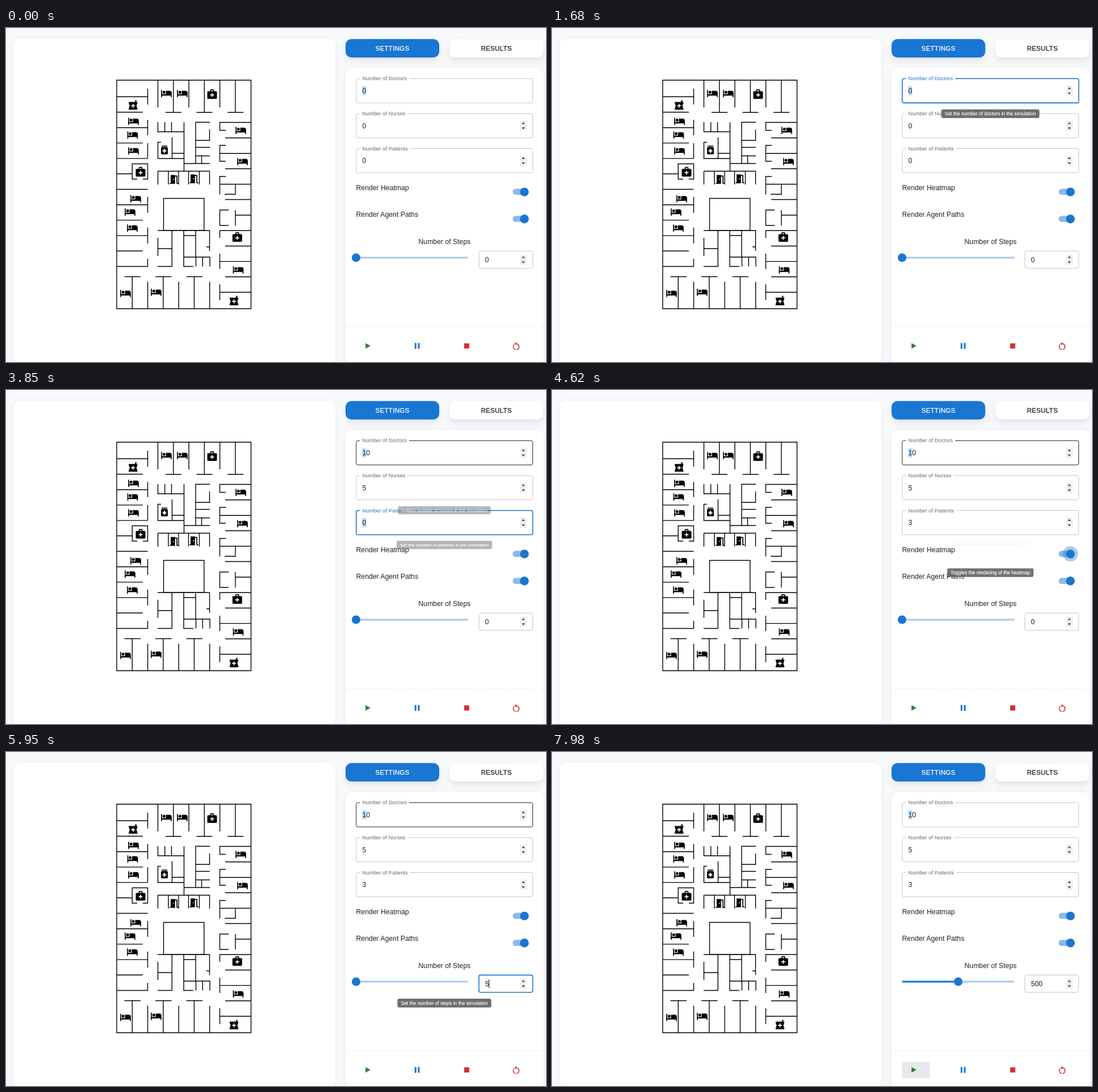
Recreate the animation shown at these times as an HTML page. Size 951x589 px, loop 8 s.

```html
<!DOCTYPE html>
<html lang="en">
<head>
<meta charset="utf-8">
<title>Hospital simulation settings</title>
<style>
  html, body { margin: 0; width: 100%; height: 100%; overflow: hidden; background: #f8f9fb; }
  svg { display: block; width: 951px; height: 589px; font-family: "Liberation Sans", Arial, sans-serif; }
  .card { fill: #fff; filter: drop-shadow(0 2px 6px rgba(40, 60, 90, .07)); }
  .tab { filter: drop-shadow(0 5px 6px rgba(40, 60, 90, .12)); }
</style>
</head>
<body>
<svg id="stage" viewBox="0 0 951 589"></svg>
<script>
const LOOP = 8000;
const BLUE = '#1976d2', INK = '#212121';
const stage = document.getElementById('stage');

function add(tag, attrs, parent = stage) {
  const el = document.createElementNS('http://www.w3.org/2000/svg', tag);
  set(el, attrs);
  parent.appendChild(el);
  return el;
}
function set(el, attrs) {
  for (const k in attrs) el.setAttribute(k, attrs[k]);
}
function text(str, x, y, size, attrs = {}, parent = stage) {
  const el = add('text', { x, y, 'font-size': size, fill: INK, ...attrs }, parent);
  el.textContent = str;
  return el;
}
const rect = (x, y, width, height, attrs, parent) => add('rect', { x, y, width, height, ...attrs }, parent);
const show = (el, on) => set(el, { opacity: +on });
const clamp = v => Math.max(0, Math.min(1, v));
const smooth = v => { v = clamp(v); return v * v * (3 - 2 * v); };
const ramp = (t, start, dur) => smooth((t - start) / dur);
const within = (t, a, b) => t >= a && t < b;
const mix = (a, b, p) => `rgb(${a.map((v, i) => Math.round(v + (b[i] - v) * p))})`;

// Cards and tabs
rect(13.5, 19, 566.5, 573, { rx: 12, class: 'card' });
rect(598, 70.5, 348.5, 522, { rx: 12, class: 'card' });
rect(598, 19.5, 165, 32.5, { rx: 10.5, fill: BLUE, class: 'tab' });
rect(781, 19.5, 165, 32.5, { rx: 10.5, fill: '#fff', class: 'tab' });
const tabText = { 'text-anchor': 'middle', 'letter-spacing': .35, 'stroke-width': .3 };
text('SETTINGS', 680.5, 39.5, 11.48, { ...tabText, fill: '#fff', stroke: '#fff' });
text('RESULTS', 863.7, 39.5, 11.48, { ...tabText, stroke: INK });

// Floor plan
const PITCH = 27.28;
let plan = 'M195 92H431.5V495H195Z';
const hline = (y, a, b) => { plan += `M${a} ${y}H${b}`; };
const vline = (x, a, b) => { plan += `M${x} ${a}V${b}`; };
for (let i = 0; i < 6; i++) {
  vline(267.5 + PITCH * i, 92, i % 2 ? 149 : 140);
  vline(222.3 + PITCH * i, i % 2 ? 447.5 : 438.5, 495);
}
for (let i = 0; i < 3; i++) {
  hline(148.8, 281 + 2 * PITCH * i, 309 + 2 * PITCH * i);
  hline(438.5, 208.5 + 2 * PITCH * i, 237 + 2 * PITCH * i);
}
[249.5, 241, 249.5, 241, 249.5, 222, 249.5, 249.5, 241, 249.5, 241, 249.5]
  .forEach((end, i) => hline(121.3 + 27.2 * i, 195, end));
[[107, 135], [162, 189], [203, 230], [298, 326], [352, 380], [407, 421]]
  .forEach(([a, b]) => vline(249.5, a, b));
[253, 286, 304, 321.5, 340.5, 358.5].forEach((x, i) => vline(i ? x : 267.5, 252.5, 276));
plan += 'M231 266.5H222.3V239.5H249.5V266.5H241';
const rightWing = 'M431 166.5H376.5V180.5H387M386 193.8H431M387 207H376.5V235H387M376.5 221.3H431' +
  'M386 248.3H431M387 261.8H376.5V293.5M376.5 275.5H431M404 275.5V293.3H385M386 302.5H431' +
  'M392 321H376.5V348.3H392M404 321V348.3M404 330H431M431 357.3H376.5V370M386 384.5H431' +
  'M376.5 398V425M376.5 411.6H431M386 438.8H431M376.5 452V480M376.5 466H431';
const core = 'M267.5 166V183H313.5M279.7 166V183M291.5 166V183M313.5 166.3V252.5M359 166.3H334V239' +
  'M358.5 179V198.3H334M334 210.5H359M334 225.5H359M344.5 225.5V239M313.5 239H359' +
  'M273 201.5H267.5V230.3H313.5M292.5 193V230.3M292.5 221H313.5M267.5 252.5H359M277.5 300.5H348.8V357H277.5Z' +
  'M267 357.2H359M267.5 370V402M267.5 389H292.3M292.3 357V420.5H267M313 357V420.5H330M313 366H334' +
  'M334 357V404M358.5 357V393M353 386H358.5M313 404H359V420.5M334.5 404V420.5M346.3 404V420.5';
add('path', { d: plan + rightWing + core, fill: 'none', stroke: '#000', 'stroke-width': 1.4 });

function icons(d, cx, cy, spots, scale = .85, fill = '#000') {
  for (const [x, y] of spots) {
    add('path', { d, fill, transform: `translate(${x} ${y}) scale(${scale}) translate(${-cx} ${-cy})` });
  }
}
const BED = 'M7 13c1.66 0 3-1.34 3-3S8.66 7 7 7s-3 1.34-3 3 1.34 3 3 3zm12-6h-8v7H3V5H1v15h2v-3h18v3h2v-9c0-2.21-1.79-4-4-4z';
const KIT = 'M20 6h-4V4c0-1.1-.9-2-2-2h-4c-1.1 0-2 .9-2 2v2H4c-1.1 0-2 .9-2 2v12c0 1.1.9 2 2 2h16c1.1 0 2-.9 2-2V8c0-1.1-.9-2-2-2zM10 4h4v2h-4V4zm6 11h-3v3h-2v-3H8v-2h3v-3h2v3h3v2z';
const MORTAR = 'M21 5h-2.64l1.14-3.14L17.15 1l-1.46 4H3v2l2 6-2 6v2h18v-2l-2-6 2-6V5zm-5 9h-3v3h-2v-3H8v-2h3V9h2v3h3v2z';
const PILLS = 'M6 3h12v2H6zm11 3H7c-1.1 0-2 .9-2 2v11c0 1.1.9 2 2 2h10c1.1 0 2-.9 2-2V8c0-1.1-.9-2-2-2zm-1 9h-2.5v2.5h-3V15H8v-3h2.5V9.5h3V12H16v3z';
const DOOR = 'M14 6v15H3v-2h2V3h9v1h5v15h2v2h-4V6h-3zm-4 5v2h2v-2h-2z';
const RESET = 'M12 5V2L8 6l4 4V7c3.31 0 6 2.69 6 6 0 2.97-2.17 5.43-5 5.91v2.02c3.95-.49 7-3.85 7-7.93 0-4.42-3.58-8-8-8zm-6 8c0-1.65.67-3.15 1.76-4.24L6.34 7.34C4.9 8.79 4 10.79 4 13c0 4.08 3.05 7.44 7 7.93v-2.02c-2.83-.48-5-2.94-5-5.91z';
icons(BED, 12, 12.5, [[282.5, 115.5], [310.5, 115.5], [224.5, 164.5], [223, 188.5], [224.5, 216.5],
  [413.5, 180.5], [416.5, 235.5], [228.5, 301], [218.5, 324.5], [222.5, 352.8], [409, 426.5],
  [210.5, 468], [264.5, 466]]);
icons(KIT, 12, 12, [[363, 116.5], [237, 253.5], [407.3, 368.5]]);
icons(MORTAR, 12, 11, [[223.8, 135.5], [401.5, 480.5]]);
icons(PILLS, 12, 12, [[279, 215.2]]);
icons(DOOR, 12, 12, [[296, 267], [331, 266]]);

// Number inputs: box, spinner, caret and selection
function makeField(x, y, w, h, name) {
  const r = 3, x2 = x + w, y2 = y + h, cy = y + h / 2;
  const box = add('path', { fill: 'none' });
  let label, from = x + r, to = x + r;
  if (name) {
    label = text(name, x + 10.7, y + 3, 9.18, { 'letter-spacing': .1 });
    from = x + 6.5;
    to = x + 14.5 + label.getComputedTextLength();
  }
  set(box, { d: `M${to} ${y}H${x2 - r}Q${x2} ${y} ${x2} ${y + r}V${y2 - r}Q${x2} ${y2} ${x2 - r} ${y2}` +
    `H${x + r}Q${x} ${y2} ${x} ${y2 - r}V${y + r}Q${x} ${y} ${x + r} ${y}H${from}` });
  const left = x + 10.6;
  const select = rect(left, cy - 8, 6.9, 16, { fill: '#b9dafb' });
  const value = text('0', left, cy + 4.4, 12.24);
  const caret = rect(left, cy - 7.5, 1, 15, { fill: '#000' });
  const spin = add('g', {});
  rect(905.5, cy - 9, 11.5, 18, { fill: '#efefef' }, spin);
  add('path', { fill: '#444', d: `M908.3 ${cy - 3}h5.6l-2.8 -3.4zM908.3 ${cy + 3}h5.6l-2.8 3.4z` }, spin);
  return { box, label, left, select, value, caret, spin };
}
function drawField(f, s) {
  set(f.box, {
    stroke: s.focus ? BLUE : s.hover ? INK : '#c4c4c4',
    'stroke-width': s.focus ? 1.6 : 1
  });
  if (f.label) set(f.label, { fill: mix([102, 102, 102], [25, 118, 210], s.tint) });
  f.value.textContent = s.value;
  show(f.spin, s.focus || s.hover);
  show(f.select, s.select);
  show(f.caret, s.caret >= 0);
  set(f.caret, { x: f.left + Math.max(0, s.caret) * 6.8 - .1 });
}
const doctors = makeField(616.8, 89.3, 310.8, 42.8, 'Number of Doctors');
const nurses = makeField(616.8, 150.9, 310.8, 42.8, 'Number of Nurses');
const patients = makeField(616.8, 212.5, 310.8, 42.8, 'Number of Patients');
const steps = makeField(832.8, 393.4, 94.8, 30.4);
const tint = (t, a, b) => ramp(t, a - 60, 200) - ramp(t, b - 60, 200);

// Switches
function makeSwitch(name, y) {
  text(name, 616.5, y - 3.4, 12.24);
  rect(892.3, y - 5.4, 26.2, 10.7, { rx: 5.35, fill: '#8cbae8' });
  const halo = add('circle', { cx: 913, cy: y, r: 14, fill: BLUE });
  add('circle', { cx: 913, cy: y + .8, r: 7.8, fill: '#000', opacity: .16 });
  add('circle', { cx: 913, cy: y, r: 7.6, fill: BLUE });
  return halo;
}
const heatHalo = makeSwitch('Render Heatmap', 289);
const pathHalo = makeSwitch('Render Agent Paths', 336.7);
function drawHalo(el, t, a, b) {
  const pulse = 13.9 - .5 * Math.cos((t - a) / 400);
  set(el, { r: pulse, opacity: .38 * (ramp(t, a - 20, 130) - ramp(t, b - 20, 150)) });
}

// Slider
text('Number of Steps', 772.2, 381, 12.24, { 'text-anchor': 'middle' });
rect(616.5, 403.4, 197.8, 3, { rx: 1.5, fill: '#a7c8ec' });
const fill = rect(616.5, 403.4, 0, 3, { rx: 1.5, fill: BLUE });
const thumbHalo = add('circle', { cy: 405, r: 13.6, fill: BLUE });
const thumb = add('circle', { cy: 405, r: 7.6, fill: BLUE });

// Controls
add('path', { d: 'M598 527H946', stroke: '#e4e7ea', 'stroke-dasharray': '2.3 1.5', 'stroke-width': .9 });
const press = rect(616.5, 546, 49, 29, { rx: 3, fill: '#e6e9ea' });
add('path', { d: 'M633.2 555.7V565.5L641.7 560.6Z', fill: '#2e7d32' });
add('path', { d: 'M719.7 555.5h3v10.3h-3zM725.4 555.5h3v10.3h-3z', fill: BLUE });
rect(806.8, 556.2, 9, 9, { fill: '#d32f2f' });
icons(RESET, 12, 11.5, [[898.5, 560.8]], .72, '#c62828');

// Tooltips
const tips = [
  ['Set the number of doctors in the simulation', 143.4, 1280, 2870],
  ['Set the number of nurses in the simulation', 205, 2870, 3780],
  ['Set the number of patients in the simulation', 266, 3780, 4480],
  ['Toggles the rendering of the heatmap', 314.4, 4480, 4760],
  ['Toggles the rendering of the agent paths', 362.1, 4760, 4970],
  ['Set the number of steps in the simulation', 435, 4970, 6930]
].map(([str, y, start, end]) => {
  const g = add('g', {});
  const back = rect(0, 0, 0, 15.4, { rx: 3, fill: '#616161', 'fill-opacity': .92 }, g);
  const label = text(str, 0, 10.7, 8.45, { fill: '#fff', stroke: '#fff', 'stroke-width': .15, 'text-anchor': 'middle' }, g);
  const w = label.getComputedTextLength() + 12.3;
  set(back, { x: -w / 2, width: w });
  return { g, y, start: start - 20, end: end - 20 };
});
function drawTip(tip, t) {
  const D = 180;
  const alpha = ramp(t, tip.start, D) - ramp(t, tip.end, D);
  const grow = ramp(t, tip.start, D * .666) - ramp(t, tip.end + D * .333, D * .666);
  const sx = .75 + .25 * grow, sy = .5625 + .4375 * grow;
  set(tip.g, { opacity: alpha, transform: `translate(772 ${tip.y}) scale(${sx} ${sy})` });
}

function render(t) {
  drawField(doctors, {
    value: t < 2450 ? '0' : '10',
    hover: within(t, 1190, 6720),
    focus: within(t, 1400, 2870),
    tint: tint(t, 1400, 2870),
    caret: within(t, 1400, 1680) || within(t, 2450, 2870) ? 1 : within(t, 2100, 2450) ? 0 : -1
  });
  drawField(nurses, {
    value: t < 3570 ? '0' : '5',
    focus: within(t, 2870, 3780),
    tint: tint(t, 2870, 3780),
    select: within(t, 2870, 3570),
    caret: within(t, 3570, 3780) ? 1 : -1
  });
  drawField(patients, {
    value: t < 4130 ? '0' : '3',
    focus: within(t, 3780, 4480),
    tint: tint(t, 3780, 4480),
    select: within(t, 3780, 4130),
    caret: within(t, 4130, 4480) ? 1 : -1
  });
  const typed = t < 5950 ? '0' : t < 6020 ? '5' : t < 6230 ? '50' : '500';
  drawField(steps, {
    value: typed,
    focus: within(t, 5250, 7770),
    select: within(t, 5250, 5950),
    caret: within(t, 5950, 6930) || within(t, 7280, 7630) ? typed.length : -1
  });

  drawHalo(heatHalo, t, 4480, 4760);
  drawHalo(pathHalo, t, 4760, 4970);

  const count = 5 * ramp(t, 5940, 80) + 45 * ramp(t, 6010, 120) + 450 * ramp(t, 6215, 220);
  const run = count / 1000 * 197.8;
  set(fill, { width: run });
  set(thumb, { cx: 616.5 + run });
  set(thumbHalo, { cx: 616.5 + run, opacity: .16 * (ramp(t, 4950, 130) - ramp(t, 5230, 130)) });

  show(press, 0);
  set(press, { opacity: .4 * ramp(t, 7610, 180) + .6 * ramp(t, 7770, 200) });
  for (const tip of tips) drawTip(tip, t);
}

function tick() {
  render(performance.now() % LOOP);
  requestAnimationFrame(tick);
}
tick();
</script>
</body>
</html>
```
